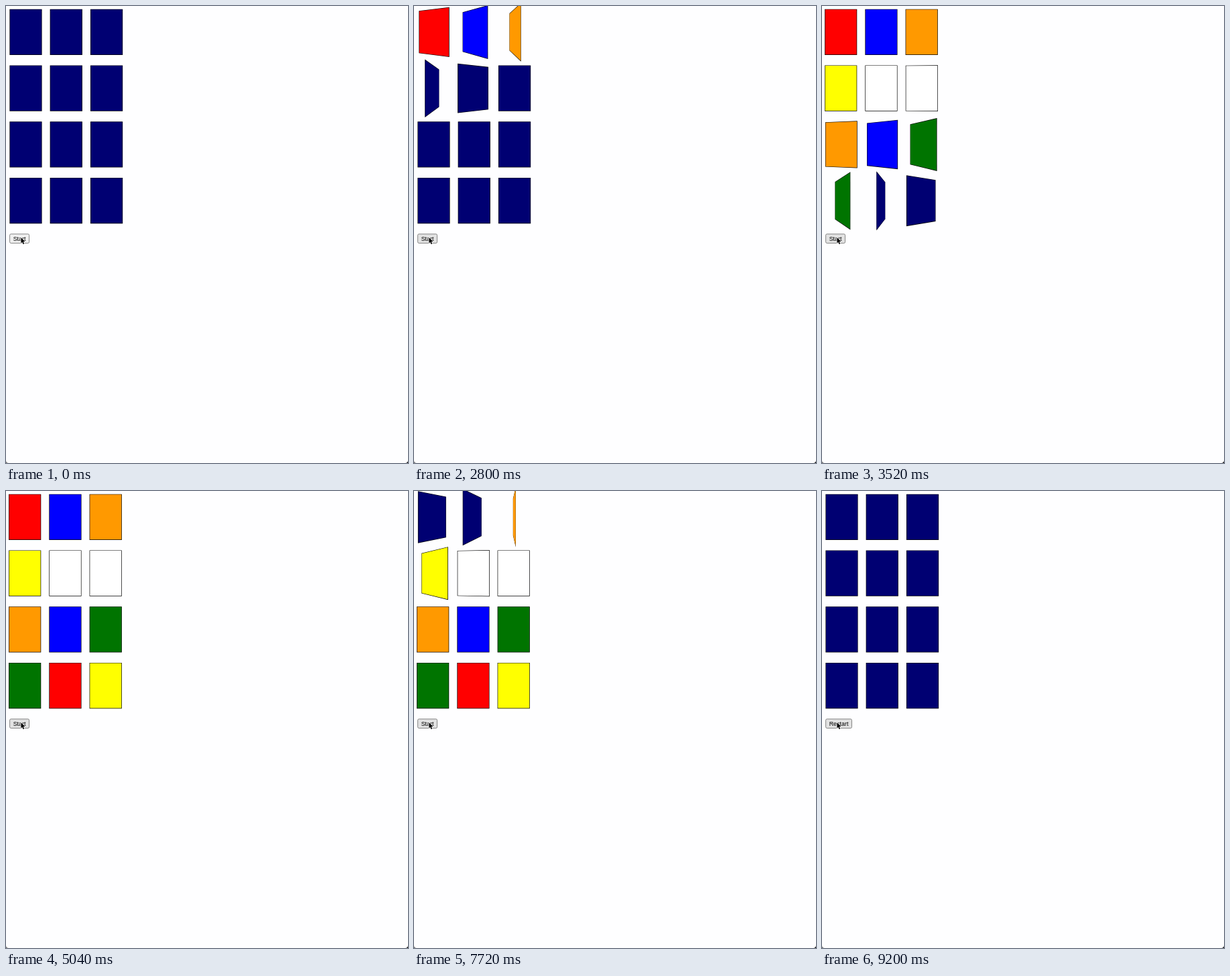
An HTML page with a canvas that plays this animation: 600x681 px, repeating every 9.6 s.

```html
<!DOCTYPE html>
<html lang="en">
<head>
<meta charset="utf-8">
<title>Memory cards</title>
<style>
  html, body { margin: 0; width: 100%; height: 100%; overflow: hidden; background: #fefeff; }
  canvas { display: block; width: 600px; height: 681px; }
</style>
</head>
<body>
<canvas id="stage"></canvas>
<script>
const W = 600, H = 681, LOOP = 9600;
const canvas = document.getElementById('stage');
const ctx = canvas.getContext('2d');
const dpr = window.devicePixelRatio || 1;
canvas.width = W * dpr;
canvas.height = H * dpr;

// Layout lengths are in page units, shown at this zoom.
const ZOOM = 0.67;
const CARD = { w: 70, h: 100, border: 1, stepX: 90, stepY: 125, left: 8, top: 7 };
const PERSPECTIVE = 150;
const FLIP = 800, STAGGER = 100;
const SHOW_AT = 2318, HIDE_AT = 7296;
const PRESS_AT = 1280, RELEASE_AT = 1360, HOVER_AT = 1040, RESTART_AT = 9200;

const BACK = '#000072';
const RED = '#ff0000', BLUE = '#0000ff', ORANGE = '#ff9900';
const YELLOW = '#ffff00', WHITE = '#ffffff', GREEN = '#007400';
const FACES = [
  RED, BLUE, ORANGE,
  YELLOW, WHITE, WHITE,
  ORANGE, BLUE, GREEN,
  GREEN, RED, YELLOW
];

const clamp = v => Math.min(1, Math.max(0, v));

// cubic-bezier(.25, .1, .25, 1)
function ease(x) {
  if (x <= 0 || x >= 1) return clamp(x);
  const curve = (a, b, s) => 3 * a * s * (1 - s) ** 2 + 3 * b * s * s * (1 - s) + s ** 3;
  let lo = 0, hi = 1;
  for (let i = 0; i < 24; i++) {
    const mid = (lo + hi) / 2;
    if (curve(0.25, 0.25, mid) < x) lo = mid; else hi = mid;
  }
  return curve(0.1, 1, lo);
}

function cardAngle(i, t) {
  const lag = 45 * clamp((t - 7720) / 560);
  const shown = ease((t - SHOW_AT - i * STAGGER) / FLIP);
  const hidden = ease((t - HIDE_AT - lag - i * STAGGER) / FLIP);
  return Math.PI * (shown - hidden);
}

function polygon(points, fill) {
  ctx.beginPath();
  points.forEach(([x, y]) => ctx.lineTo(x, y));
  ctx.closePath();
  ctx.fillStyle = fill;
  ctx.fill();
}

function drawCard(i, t) {
  const angle = cardAngle(i, t);
  const cos = Math.cos(angle), sin = Math.sin(angle);
  const cx = CARD.left + (i % 3) * CARD.stepX + CARD.w / 2;
  const cy = CARD.top + Math.floor(i / 3) * CARD.stepY + CARD.h / 2;

  const project = (x, y) => {
    const s = PERSPECTIVE / (PERSPECTIVE + x * sin);
    return [(cx + x * cos * s) * ZOOM, (cy + y * s) * ZOOM];
  };
  // The border makes each face stick out past the card on the right and bottom.
  const face = inset => {
    const x0 = -CARD.w / 2 + inset, x1 = CARD.w / 2 + 2 * CARD.border - inset;
    const y0 = -CARD.h / 2 + inset, y1 = CARD.h / 2 + 2 * CARD.border - inset;
    return [project(x0, y0), project(x1, y0), project(x1, y1), project(x0, y1)];
  };
  polygon(face(0), '#000');
  polygon(face(CARD.border), cos >= 0 ? BACK : FACES[i]);
}

function buttonFill(t) {
  if (t < HOVER_AT) return '#efefef';
  return t >= PRESS_AT && t < RELEASE_AT ? '#f5f5f5' : '#e2e2e2';
}

function drawButton(t) {
  const label = t >= RESTART_AT ? 'Restart' : 'Start';
  ctx.font = `${13.333 * ZOOM}px "Liberation Sans", Arial, sans-serif`;
  const width = ctx.measureText(label).width + 16 * ZOOM;
  ctx.beginPath();
  ctx.roundRect(5.6, 339.8, width - 0.6, 13.6, 1.8);
  ctx.fillStyle = buttonFill(t);
  ctx.fill();
  ctx.lineWidth = 0.8;
  ctx.strokeStyle = '#6a6a6a';
  ctx.stroke();
  ctx.fillStyle = '#000';
  ctx.textAlign = 'center';
  ctx.textBaseline = 'alphabetic';
  ctx.fillText(label, 5.3 + width / 2, 349.7);
}

function drawCursor() {
  const arrow = [[0, 0], [0, 8.6], [1.9, 6.8], [3.3, 10], [4.8, 9.3], [3.5, 6.3], [6.1, 6.2]];
  const points = arrow.map(([x, y]) => [x + 22.4, y + 344.9]);
  ctx.beginPath();
  points.forEach(([x, y]) => ctx.lineTo(x, y));
  ctx.closePath();
  ctx.lineJoin = 'round';
  ctx.lineWidth = 1.2;
  ctx.strokeStyle = '#fff';
  ctx.stroke();
  polygon(points, '#000');
}

function drawCorner(x, dir, fill) {
  const r = 4;
  ctx.beginPath();
  ctx.moveTo(x, H);
  ctx.lineTo(x, H - r);
  ctx.quadraticCurveTo(x, H, x + dir * r, H);
  ctx.closePath();
  ctx.fillStyle = fill;
  ctx.fill();
}

function draw(t) {
  ctx.setTransform(dpr, 0, 0, dpr, 0, 0);
  ctx.fillStyle = '#fefeff';
  ctx.fillRect(0, 0, W, H);
  FACES.forEach((_, i) => drawCard(i, t));
  drawButton(t);
  drawCursor();
  drawCorner(0, 1, '#666');
  drawCorner(W, -1, '#000');
}

const start = performance.now();
function tick() {
  draw((performance.now() - start) % LOOP);
  requestAnimationFrame(tick);
}
tick();
</script>
</body>
</html>
```
